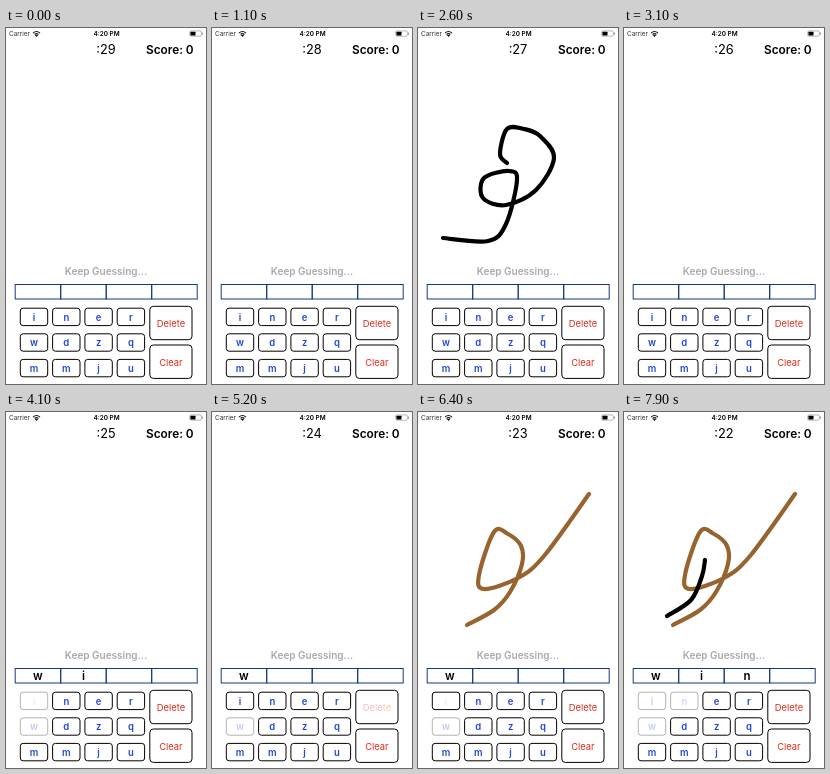
Write an HTML page that moves like this. It is 200 px wide and 356 px high and loops after 8 s.

```html
<!DOCTYPE html>
<html lang="en">
<meta charset="utf-8">
<title>Drawing and guessing game</title>
<style>
  html, body { margin: 0; width: 100%; height: 100%; overflow: hidden; background: #fff; }
  svg { display: block; width: 100%; height: 100%; font-family: Inter, Roboto, sans-serif; }
  .mid { text-anchor: middle; }
  .ink { fill: none; stroke-width: 4.2; stroke-linecap: round; stroke-linejoin: round; }
  .box { fill: none; stroke: #000; }
  .key { fill: #1f45dc; font-size: 9.5px; font-weight: 600; }
  .cmd { fill: #e32b17; font-size: 9.4px; }
  .cell { font-size: 11.5px; font-weight: 600; }
  .slot { fill: none; stroke: #14387c; }
</style>
<svg id="stage" viewBox="0 0 200 356">
  <text x="3" y="8.2" font-size="6.4" fill="#333">Carrier</text>
  <path d="M27 5.1Q30.5 1.9 34 5.1M28.6 6.5Q30.5 4.8 32.4 6.5M30.5 8.2l-.6 -.7h1.2z" fill="none" stroke="#111" stroke-width="1.1"/>
  <text class="mid" x="100.5" y="8.2" font-size="6.4" font-weight="600">4:20 PM</text>
  <rect x="183.7" y="2.9" width="11.6" height="5.3" rx="1.3" fill="none" stroke="#888" stroke-width=".6"/>
  <rect x="184.5" y="3.7" width="5" height="3.7" rx=".5"/>
  <path d="M196.4 4.6v2" stroke="#888"/>
  <text id="timer" class="mid" x="100" y="26.2" font-size="12.8"></text>
  <text x="140" y="26" font-size="11.8" font-weight="600">Score: 0</text>
  <g id="canvas"></g>
  <text class="mid" x="100" y="247" font-size="10" font-weight="600" fill="#a9a9a9">Keep Guessing...</text>
</svg>
<script>
const LOOP = 8000, STEP = 100;
const stage = document.getElementById('stage');
const canvas = document.getElementById('canvas');
const timer = document.getElementById('timer');

function add(parent, tag, attrs, text = '') {
  const el = document.createElementNS('http://www.w3.org/2000/svg', tag);
  for (const name in attrs) el.setAttribute(name, attrs[name]);
  el.textContent = text;
  parent.append(el);
  return el;
}

function button(label, cls, x, y, width, height, rx) {
  const border = add(stage, 'rect', { class: 'box', x, y, width, height, rx });
  const text = add(stage, 'text', { class: 'mid ' + cls, x: x + width / 2, y: y + height / 2 + 3.8 }, label);
  return { border, text };
}

const cells = [0, 1, 2, 3].map(i => {
  const x = 9.2 + 45.5 * i;
  add(stage, 'rect', { class: 'slot', x, y: 256.5, width: 45.5, height: 14.5 });
  return add(stage, 'text', { class: 'mid cell', x: x + 22.7, y: 268 });
});
const keys = [...'inerwdzqmmju'].map((c, i) =>
  button(c, 'key', 14.3 + i % 4 * 32.3, 280.2 + Math.floor(i / 4) * 25.6, 27.4, 17.4, 2.8));
const [del] = ['Delete', 'Clear'].map((label, i) =>
  button(label, 'cmd', 143.8, 278.3 + 38.7 * i, 42.2, 33.4, 3.5));

// Smooth curve through a few points (Catmull-Rom)
function curve(points) {
  const p = points.split(' ').map(s => s.split(',').map(Number));
  const at = i => p[Math.max(0, Math.min(p.length - 1, i))];
  const handle = (i, side) => at(i).map((v, k) => v + side * (at(i + 1)[k] - at(i - 1)[k]) / 6);
  return 'M' + p[0] + p.slice(1).map((q, i) => `C${handle(i, 1)} ${handle(i + 1, -1)} ${q}`).join('');
}

function stroke(color, from, to, wiped, points) {
  const el = add(canvas, 'path', { class: 'ink', stroke: color, d: curve(points) });
  return { el, from, to, wiped, length: el.getTotalLength() };
}

const strokes = [
  stroke('#000', 1150, 2600, 3000, '25,210 70,213 88,196 99,152 91,143 66,150 65,170 88,177 118,162 136,130 122,108 106,101 89,101 82,126 89,135'),
  stroke('#97632f', 5530, 6400, LOOP, '49,213 76,198 92,180 104,152 103,134 90,122 76,120 61,163 66,177 100,166 126,144 171,82'),
  stroke('#000', 7600, 7900, LOOP, '43,204 67,188 78,164 81,148')
];

const guesses = [
  { key: keys[4], cell: cells[0], pressed: 3300, entered: 3500 },
  { key: keys[0], cell: cells[1], pressed: 4000, entered: 4100, undone: 5200 },
  { key: keys[0], cell: cells[1], pressed: 6400, entered: 6600 },
  { key: keys[1], cell: cells[2], pressed: 7500, entered: 7700 }
];

function draw(t) {
  timer.textContent = ':' + (29 - Math.floor(t / 1000));

  for (const { el, from, to, wiped, length } of strokes) {
    const part = Math.min(1, (t - from) / (to - from));
    el.style.display = part > 0 && t < wiped ? '' : 'none';
    el.style.strokeDasharray = `${length * Math.max(0, part)} 999`;
  }

  for (const { border, text } of keys) border.style.opacity = text.style.opacity = 1;
  for (const c of cells) c.textContent = '';
  for (const { key, cell, pressed, entered, undone = LOOP } of guesses) {
    if (t < pressed || t >= undone) continue;
    key.text.style.opacity = Math.min(.28, .12 + Math.max(0, t - entered) / 2500);
    if (t < entered) continue;
    key.border.style.opacity = .3;
    cell.textContent = key.text.textContent;
  }
  del.text.style.opacity = t >= 5100 && t < 5300 ? .3 : 1;
}

function frame(now) {
  draw(Math.floor(now % LOOP / STEP) * STEP);
  requestAnimationFrame(frame);
}
draw(0);
requestAnimationFrame(frame);
</script>
</html>
```
